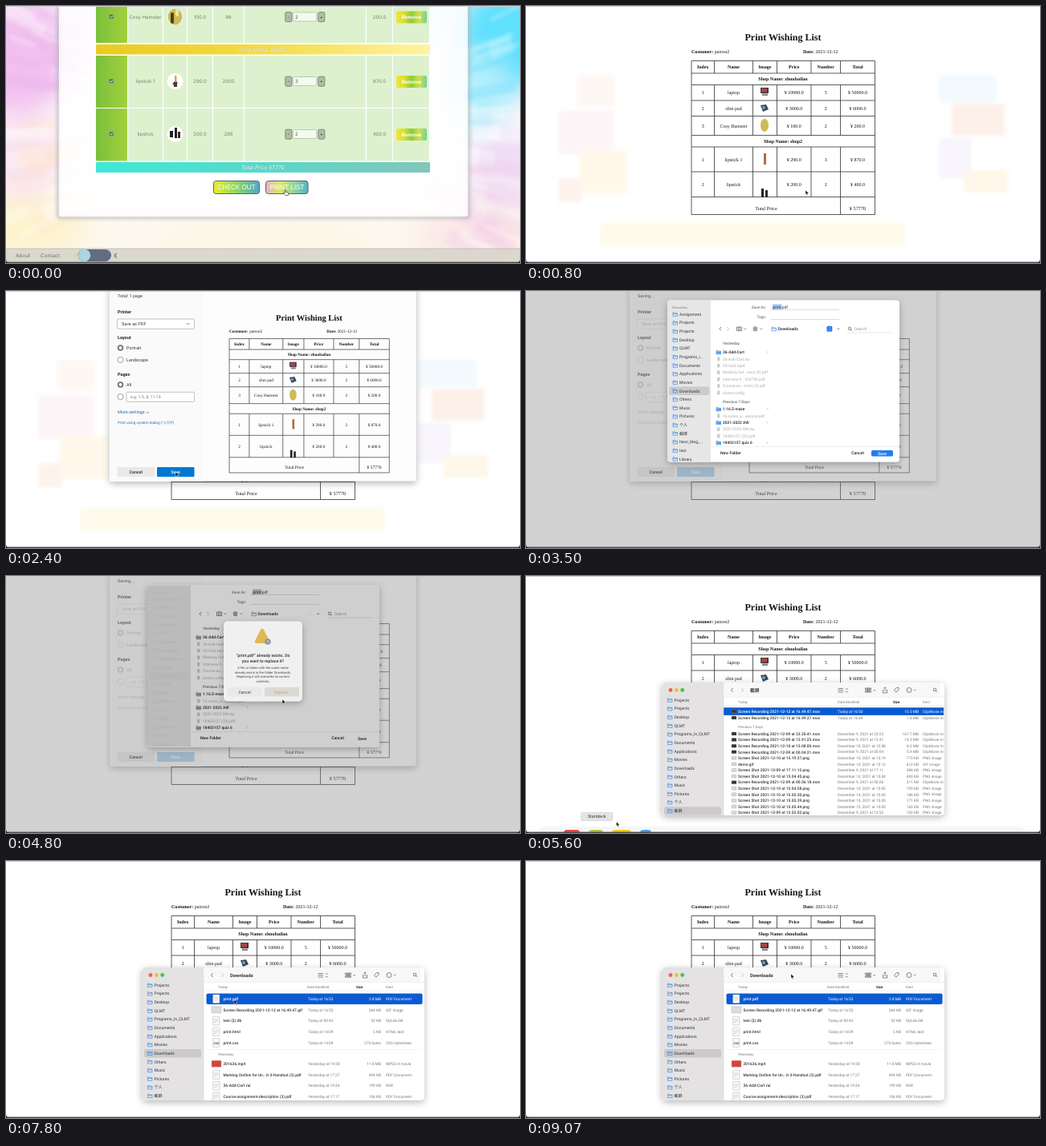
An HTML page that plays this animation: 640x321 px, repeating every 9.25 s.

```html
<!DOCTYPE html>
<html lang="en">
<head>
<meta charset="utf-8">
<title>Print wishing list</title>
<style>
html, body { margin: 0; width: 100%; height: 100%; overflow: hidden; background: #fff; }
svg { display: block; width: 640px; height: 321px; text-rendering: geometricPrecision; }
text { font-family: Roboto, "Noto Sans CJK SC", "Noto Sans CJK", sans-serif; white-space: pre; }
.shop text { font-family: Inter, sans-serif; }
.sheet text { font-family: "Liberation Serif", serif; }
.idle { filter: grayscale(1); }
.idle .places { opacity: .08; }
</style>
</head>
<body>
<svg id="stage" viewBox="0 0 640 321" xmlns="http://www.w3.org/2000/svg"></svg>
<script>
const LOOP = 9250;

// Markup helpers; the y of a text is its middle
const rect = (x, y, w, h, fill, r = 0, more = '') =>
  `<rect x="${x}" y="${y}" width="${w}" height="${h}" fill="${fill}" rx="${r}" ${more}/>`;
const text = (x, y, s, size = 5, fill = '#333', more = '') =>
  `<text x="${x}" y="${y + size * .36}" font-size="${size}" fill="${fill}" ${more}>${s}</text>`;
const dot = (x, y, r, fill, more = '') => `<circle cx="${x}" cy="${y}" r="${r}" fill="${fill}" ${more}/>`;
const line = (d, stroke = '#555', w = .7, fill = 'none') =>
  `<path d="${d}" stroke="${stroke}" stroke-width="${w}" fill="${fill}"/>`;
const group = (id, body, more = '') => `<g id="${id}" ${more}>${body}</g>`;
const grad = (id, ...stops) => `<linearGradient id="${id}">` + stops.map((c, i) =>
  `<stop offset="${i / (stops.length - 1)}" stop-color="${c}"/>`).join('') + '</linearGradient>';
const MID = 'text-anchor="middle"', END = 'text-anchor="end"', BOLD = 'font-weight="700"', SEMI = 'font-weight="500"';

const defs = '<defs>' +
  grad('check', '#78c03c', '#8fc83c', '#a2d03d') + grad('gold', '#e8cb22', '#f3dc43', '#fff3a3') +
  grad('aqua', '#3fe8d6', '#58d9cb', '#83c6bb') + grad('remove', '#f0e53a', '#d9e02c', '#8ccb3e', '#d3e04a', '#6fd0a0') +
  grad('buy', '#e9ee2b', '#8ed663', '#4fa9c8') + grad('print', '#e7b2c8', '#dcea62', '#8ed6a0', '#58b3c4') +
  '<linearGradient id="sky" x2="0" y2="1"><stop stop-color="#fbf3fc"/><stop offset=".6" stop-color="#fdf8f8"/><stop offset="1" stop-color="#fcf8ea"/></linearGradient>' +
  '<filter id="soft" x="-30%" y="-30%" width="160%" height="160%"><feGaussianBlur stdDeviation="16"/></filter>' +
  '<filter id="smear"><feGaussianBlur stdDeviation="2"/></filter>' +
  '<filter id="drop" x="-10%" y="-10%" width="120%" height="125%"><feDropShadow dx="0" dy="2.5" stdDeviation="4" flood-opacity=".28"/></filter></defs>';

let seed = 7;
const rnd = () => (seed = seed * 16807 % 2147483647) / 2147483647;

function watercolor() {
  const blobs = [
    [15, 60, 70, 75, '#f1c0ef'], [110, 10, 50, 30, '#f6dff6'], [20, 190, 50, 50, '#fae2ee'],
    [625, 40, 65, 70, '#5fe0fd'], [590, 110, 40, 50, '#b4effc'], [500, 5, 70, 25, '#cdf3fd'], [620, 200, 45, 50, '#f0dcf4'],
    [30, 275, 70, 35, '#fdf3cc'], [320, 295, 130, 18, '#fdf6e2'], [580, 285, 70, 30, '#fbe6e6']
  ].map(([x, y, a, b, c]) => `<ellipse cx="${x}" cy="${y}" rx="${a}" ry="${b}" fill="${c}"/>`).join('');
  // Brush strokes point to the middle of the page
  let strokes = '';
  for (let i = 0; i < 70; i++) {
    const right = i % 2, x = right ? 560 + rnd() * 80 : rnd() * 80, y = rnd() * 300;
    const c = rnd() < .5 ? '#fff' : right ? (y < 120 ? '#62dbfa' : '#f0c8ea') : (y < 150 ? '#e8b0ea' : '#fde2c4');
    const turn = Math.atan2(y - 150, x - 320) * 180 / Math.PI;
    strokes += rect(x - 35, y, 30 + rnd() * 45, 4 + rnd() * 18, c, 0, `opacity=".27" transform="rotate(${turn} ${x} ${y})"`);
  }
  return rect(0, 0, 640, 321, 'url(#sky)') + `<g filter="url(#soft)">${blobs}</g><g filter="url(#smear)">${strokes}</g>`;
}

function cart() {
  const cols = [152, 196, 226, 258, 297, 449, 482, 528];
  const row = (top, h, mid, name, price, stock, count, sum) => {
    let s = rect(112, top, 39, h, 'url(#check)', 1);
    for (let i = 0; i < 7; i++) s += rect(cols[i], top, cols[i + 1] - cols[i] - 1.2, h, '#ddf1cf', 1);
    s += rect(128.7, mid - 2.7, 5, 5, '#5d6b78', 1) + line(`M129.8 ${mid - .2}l1.2 1.3 1.8-2.6`, '#fff', .8);
    [[173.5, name], [241.5, price], [277, stock], [465, sum]].forEach(([x, v]) => s += text(x, mid, v, 6, '#7b8073', MID));
    s += dot(210.5, mid, 10, '#fff');
    [[347.8, '-'], [388.8, '+']].forEach(([x, v]) =>
      s += rect(x, mid - 5.8, 8, 12, '#b1bfa6', 1.5, 'stroke="#6b7463" stroke-width=".8"') + text(x + 4, mid, v, 6, '#333', MID));
    s += rect(357.3, mid - 5.5, 29.5, 11, '#f4fbee', 2, 'stroke="#a9b59e" stroke-width=".7"') + text(360, mid, count, 6, '#555');
    return s + rect(486, mid - 7, 38, 15, 'url(#remove)', 2) + text(505, mid + .5, 'Remove', 6.3, '#fff', MID + ' ' + BOLD);
  };
  const bar = (y, h, fill, s) => rect(112, y, 416, h, `url(#${fill})`, 1.5) +
    text(320.3, y + h / 2 + .4, s, 6.5, '#777', MID + ' font-style="italic" opacity=".6"') +
    text(319.8, y + h / 2, s, 6.5, '#fff', MID + ' font-style="italic"');
  return watercolor() +
    rect(65, -8, 511, 272, 'none', 2, 'stroke="#aab0b6" stroke-width="4" opacity=".7" filter="url(#smear)"') +
    rect(66, -8, 509, 271, '#fff', 2, 'fill-opacity=".85"') +
    row(-20, 66, 13.5, 'Cosy Hamster', '100.0', '98', '2', '200.0') +
    `<ellipse cx="210.5" cy="13.5" rx="9" ry="10" fill="#cdbb58"/>` + rect(205, 8, 4, 14, '#4a4226', 2) + rect(211, 4, 4, 9, '#efe3a0', 2) +
    bar(48, 12.5, 'gold', 'Shop Name: shop2') +
    row(62, 65, 94, 'lipstick 1', '290.0', '2000', '3', '870.0') +
    line('M207 97l4-4 3 3-4 4z', 'none', 0, '#bb4a2e') + rect(210, 87, 2.5, 8, '#d6a548') + rect(209, 95, 4, 6, '#4b3a30') +
    row(128, 65.5, 160, 'lipstick', '200.0', '298', '2', '400.0') +
    rect(204, 156, 4, 8, '#222') + rect(210, 152, 3, 13, '#262020') + rect(214, 157, 3, 8, '#3a2529') +
    bar(195, 13, 'aqua', 'Total Price:57770') +
    rect(258.5, 218.5, 57, 16, 'url(#buy)', 3, 'stroke="#52666a"') + text(287, 226.5, 'CHECK OUT', 8, '#fff', MID) +
    rect(323.5, 218.5, 52.5, 16, 'url(#print)', 3, 'stroke="#52666a"') + text(350, 226.5, 'PRINT LIST', 8, '#fff', MID) +
    rect(0, 303, 640, 16.5, '#d9d6cd', 0, 'opacity=".93"') + rect(0, 302.6, 640, .8, '#bdbab3') +
    text(12, 311.5, 'About', 6.4, '#707070') + text(43, 311.5, 'Contact', 6.4, '#707070') +
    dot(86, 311.5, 2, '#eed66a') + rect(89.5, 304, 41.5, 15, '#626d80', 7.5) + dot(97.5, 311.5, 7.7, '#a9d5e4') +
    line('M138.6 308.6a3.2 3.2 0 1 0 0 6 4 4 0 0 1 0-6', 'none', 0, '#999');
}

function sheet() {
  const xs = [206, 234.5, 282.5, 312.5, 355, 391.5, 434.5];
  const mids = xs.slice(1).map((x, i) => (x + xs[i]) / 2);
  const cells = (top, bottom, vals, more = '') => {
    let d = xs.map(x => `M${x} ${top}V${bottom}`).join('') + `M206 ${bottom}H434.5`;
    return line(d, '#333', .8) + vals.map((v, i) => v && text(mids[i], (top + bottom) / 2, v, 6, '#111', MID + more)).join('');
  };
  const shop = (top, name) => line(`M206 ${top}v14.5H434.5v-14.5`, '#333', .8) +
    text(320, top + 7.3, 'Shop Name: ' + name, 6, '#111', MID + ' ' + BOLD);
  return text(320, 38.8, 'Print Wishing List', 12, '#111', MID + ' ' + BOLD) +
    text(206, 57.3, '<tspan font-weight="700">Customer:</tspan> patron2', 6, '#111') +
    text(345, 57.3, '<tspan font-weight="700">Date:</tspan> 2021-12-12', 6, '#111') +
    line('M206 68.5H434.5', '#333', .8) +
    cells(68.5, 84, ['Index', 'Name', 'Image', 'Price', 'Number', 'Total'], ' ' + BOLD) + shop(84, 'zhoubailan') +
    cells(98.5, 118, ['1', 'laptop', '', '¥ 10000.0', '5', '¥ 50000.0']) +
    cells(118, 137.5, ['2', 'slim pad', '', '¥ 3000.0', '2', '¥ 6000.0']) +
    cells(137.5, 161.5, ['3', 'Cosy Hamster', '', '¥ 100.0', '2', '¥ 200.0']) + shop(161.5, 'shop2') +
    cells(176, 207, ['1', 'lipstick 1', '', '¥ 290.0', '3', '¥ 870.0']) +
    cells(207, 238.5, ['2', 'lipstick', '', '¥ 200.0', '2', '¥ 400.0']) +
    line('M206 238.5V260.5H434.5V238.5M391.5 238.5v22', '#333', .8) +
    text(299, 252.5, 'Total Price', 6.3, '#111', MID) + text(413, 252.5, '¥ 57770', 6.3, '#111', MID) +
    rect(292, 102, 10, 7, '#3b3d48') + rect(293, 103, 7, 4.5, '#b2423e') + rect(294, 109.5, 7, 2.5, '#888') +
    line('M292 124l7-1 3 6-7 3z', 'none', 0, '#3d4654') + dot(296, 127, 2, '#6b9cc8') +
    `<ellipse cx="297" cy="149" rx="5" ry="8" fill="#cdbb58"/>` +
    rect(296, 184, 3, 14, '#b76b3c') + rect(293, 228, 3, 11, '#222') + rect(298, 230, 3, 9, '#3a2529');
}

function dialog() {
  const radio = (y, on, s) => dot(142.5, y, 3.6, '#fff', 'stroke="#888" stroke-width=".8"') +
    (on ? dot(142.5, y, 2.7, 'none', 'stroke="#777" stroke-width="1.6"') : '') + text(150, y, s, 5.5, '#333');
  const blue = '#1670c5';
  return rect(129, -12, 382, 250, '#fafafa', 3, 'filter="url(#drop)"') + rect(244.5, -10, 266.5, 248, '#e2e2e2') +
    group('loading', line('M383 112a6 6 0 1 1-6-6', '#f6f6f6', 1.6)) +
    group('preview', rect(244.5, -10, 266, 247, '#fdfdfd') + '<use href="#list" transform="translate(98.4 -.2) scale(.872)"/>') +
    group('total', text(139, 6, 'Total: 1 page', 5.4)) +
    text(139, 26.5, 'Printer', 5.5, '#222', BOLD) +
    rect(138.5, 35, 96, 12.3, '#fff', 1, 'stroke="#aaa" stroke-width=".7"') + text(144, 41.2, 'Save as PDF', 5.5) + line('M224.5 40l2 2 2-2') +
    text(139, 58.5, 'Layout', 5.5, '#222', BOLD) + radio(71, 1, 'Portrait') + radio(86, 0, 'Landscape') +
    text(139, 104.5, 'Pages', 5.5, '#222', BOLD) + radio(117, 1, 'All') + radio(132, 0, '') +
    rect(150, 126.3, 84.5, 12, '#fff', 1, 'stroke="#aaa" stroke-width=".7"') + text(155, 132.3, 'e.g. 1-5, 8, 11-13', 5.2, '#777') +
    text(139, 151.5, 'More settings', 5.5, blue) + line('M175 151l1.6 1.6 1.6-1.6', blue) +
    text(139, 164, 'Print using system dialog (⌥⌘P)', 4.7, blue) +
    rect(188, 220, 46.5, 12, '#0078d4', 1) + text(211.2, 226, 'Save', 5.3, '#fff', MID + ' ' + SEMI) +
    group('busy', rect(130, 12, 114, 225, '#f8f8f8', 0, 'opacity=".68"') + text(139, 6, 'Saving...', 5.4) +
      text(139, 26.5, 'Printer', 5.5, '#666', BOLD) + text(139, 58.5, 'Layout', 5.5, '#666', BOLD) + text(139, 104.5, 'Pages', 5.5, '#666', BOLD)) +
    rect(138.5, 220, 46.5, 12, '#e9e9e9', 1) + text(161.7, 226, 'Cancel', 5.3, '#222', MID + ' ' + SEMI);
}

const folder = (x, y, c = '#3b8eea') => line(`M${x} ${y - 2}h2l.7.8h2.8v3.6h-5.5zM${x} ${y - .4}h5.5`, c, .7);
const glass = (x, y) => dot(x, y, 1.8, 'none', 'stroke="#555" stroke-width=".7"') + line(`M${x + 1.3} ${y + 1.3}l1.6 1.6`);
const PLACES = ['Projects', 'Projects', 'Desktop', 'QLMT', 'Programs_in_QLMT', 'Documents', 'Applications', 'Movies',
  'Downloads', 'Others', 'Music', 'Pictures', '个人', '截屏'];
const sidebar = (x, y, items, dx) => items.map((s, i) =>
  folder(x, y + i * 10.63) + text(x + dx, y + i * 10.63, s, 5.1, '#333')).join('');

function savePanel() {
  const places = ['Assignment', ...PLACES, 'hexo_blog_...', 'test', 'Library'];
  places[5] = 'Programs_i...';
  const file = y0 => (s, i) => {
    const open = s[0] === '*', y = y0 + i * 8.4;
    return (open ? folder(237, y, '#2c7fe0') + rect(237.3, y - .6, 5, 2.4, '#4ba0f0') + line(`M300 ${y - 1.2}l1.2 1.2-1.2 1.2`, '#888', .5)
      : rect(238, y - 2.3, 3.4, 4.6, '#ccc', .4)) + text(245, y, s.replace('*', ''), 4.9, open ? '#222' : '#aaa', open ? SEMI : '');
  };
  return rect(176, 11.5, 289, 202, '#fff', 4, 'filter="url(#drop)"') +
    line('M180 11.5H230V213.5H180a4 4 0 0 1-4-4v-194a4 4 0 0 1 4-4', 'none', 0, '#e6e6e6') +
    '<g class="places">' + text(182, 20.5, 'Favourites', 4, '#999', BOLD) + rect(178, 119.5, 50, 10.5, '#cbcbcb', 2) +
    sidebar(183, 29, places, 8) + '</g>' +
    text(299, 20, 'Save As:', 4.8, '#555', END) + rect(307, 16.5, 11.5, 6.5, '#9cc8fa') + text(307.3, 19.8, 'print.pdf', 5) +
    text(299, 32, 'Tags:', 4.8, '#555', END) + line('M305 23.5H390M305 35.5H390', '#bbb', .5) +
    line('M243 45l-2 2.2 2 2.2', '#444') + line('M250.5 45l2 2.2-2 2.2', '#aaa') +
    line('M262.5 45h6v4.6h-6zM264.5 45v4.6M266.5 45v4.6M271.5 46.6l1.3 1.3 1.3-1.3') +
    line('M283.5 45h4v4.6h-4zM283.5 47.3h4M285.5 45v4.6M291.5 46.6l1.3 1.3 1.3-1.3') +
    folder(306, 47.3) + text(313.5, 47.3, 'Downloads', 5.1, '#222', SEMI) +
    group('stepper', rect(374.5, 43.8, 6.8, 7, '#217df2', 1.5)) + line('M376.6 46.6l1.3-1.3 1.3 1.3M376.6 48l1.3 1.3 1.3-1.3', '#ddd', .6) +
    line('M387.5 48l1.3-1.4 1.3 1.4', '#444') + glass(403, 46.8) + text(409, 47.3, 'Search', 5, '#999') + line('M400 52H457', '#ccc', .5) +
    text(245, 65, 'Yesterday', 4.7, '#666', SEMI) +
    ['*36-Add-Cart', '36-Add-Cart.rar', '201636.mp4', 'Marking Out...nout (3).pdf', 'interview 9...934750.pdf', 'Course-as...ment (3).pdf', 'share.config'].map(file(76.5)).join('') +
    text(245, 138.5, 'Previous 7 Days', 4.7, '#666', SEMI) +
    ['*1.16.5-maze', '16 notes_a...second.pdf', '*2021-2022 AW', '2021-2022 AW.zip', '18403157 (22).pdf', '*18403157 quiz 6'].map(file(147.5)).join('') +
    line('M230 194.5H465', '#ddd', .5) + text(242, 202.5, 'New Folder', 5.1, '#222', SEMI) +
    text(413, 202.5, 'Cancel', 5.1, '#222', MID + ' ' + SEMI) + text(443.5, 202.7, 'Save', 5.1, '#222', MID + ' ' + SEMI) +
    group('ready', rect(430, 199, 27, 7.6, '#217df2', 1.5) + text(443.5, 202.7, 'Save', 5.1, '#fff', MID + ' ' + SEMI));
}

function alertBox() {
  const mid = (y, s, size, more = '') => text(320, y, s, size, '#444', MID + more);
  return rect(176, 11.5, 289, 202, '#000', 4, 'opacity=".19"') +
    rect(271, 56.5, 98, 100, '#f0f0f0', 5, 'filter="url(#drop)"') +
    line('M317 67q2-3 4 0l7 14q1 3-2 3h-14q-3 0-2-3z', 'none', 0, '#e2b853') + dot(326, 82, 3.8, '#92969c') + line('M326 80v2.2l1.6 1', '#fff', .7) +
    mid(99, '“print.pdf” already exists. Do', 5.2, ' ' + BOLD) + mid(105.7, 'you want to replace it?', 5.2, ' ' + BOLD) +
    ['A file or folder with the same name', 'already exists in the folder Downloads.', 'Replacing it will overwrite its current', 'contents.']
      .map((s, i) => mid(115 + i * 5.4, s, 4.1)).join('') +
    rect(275.5, 139, 43, 11.5, '#e9e9e9', 2) + text(297, 144.7, 'Cancel', 5, '#333', MID) +
    rect(322, 139, 43, 11.5, '#dcdad5', 2) + text(343, 144.7, 'Replace', 5, '#c9a86a', MID);
}

const BLUE = '#0a5bd3';
const shell = (title, lit) => rect(169, 133, 352, 166, '#fff', 5, 'filter="url(#drop)"') +
  line('M174 133H246V299H174a5 5 0 0 1-5-5V138a5 5 0 0 1 5-5', 'none', 0, '#e4e2e3') +
  dot(180, 142.5, 2.4, '#f35f57') + dot(187.3, 142.5, 2.4, '#f8bd2f') + dot(194.7, 142.5, 2.4, '#3fc745') +
  rect(172, lit - 5, 71, 10.4, '#cbc9ca', 2) + sidebar(176.5, 155, PLACES, 8) + line('M246 133V299', '#ccc', .5) +
  rect(246.2, 133, 270, 18, '#f8f8f8') +
  line('M257.5 140l-2 2.5 2 2.5', '#444') + line('M268.5 140l2 2.5-2 2.5', '#aaa') + text(279, 142.7, title, 5.8, '#333', BOLD) +
  line('M388.5 140.5h6.5M388.5 142.7h6.5M388.5 145h6.5M398 141.7l1.4-1.5 1.4 1.5M398 143.7l1.4 1.5 1.4-1.5') +
  line('M422.5 140h7v1.8h-7zM422.5 143.4h7v1.8h-7zM425 140v5M427.3 140v5M432.5 142l1.3 1.3 1.3-1.3') +
  line('M444.5 142v4h5v-4M447 144v-5M445.6 140.3l1.4-1.4 1.4 1.4') + line('M458.5 142.5l3-3h2.5v2.5l-3.3 3.3z') +
  dot(477, 142.5, 3, 'none', 'stroke="#555" stroke-width=".7"') + text(477, 142.1, '···', 5, '#555', MID) + line('M483 142l1.2 1.2 1.2-1.2') +
  glass(509, 142) + line('M246 151.3H521M246 162H521', '#ddd', .5);
const heads = (date, size, kind) => text(264, 157, 'Today', 4.4, '#777') + text(date, 157, 'Date Modified', 4.4, '#777') +
  text(size, 157, 'Size', 4.4, '#222', BOLD) + text(kind, 157, 'Kind', 4.4, '#777');

function recordings() {
  const row = (y, [name, date, size], on) => {
    const kind = name.endsWith('mov') ? 'ClipMovie m' : name.endsWith('gif') ? 'GIF image' : 'PNG image';
    const ink = on ? '#fff' : '#333', pale = on ? '#fff' : '#777';
    return (on ? rect(246.2, y - 4.7, 274, 9.6, BLUE) : '') + rect(256, y - 2, 6, 4, kind[0] === 'C' ? '#333' : '#d4d7dc', .4, 'stroke="#999" stroke-width=".3"') +
      text(264, y, name, 4.9, ink, SEMI) + text(388, y, date, 4.8, pale) + text(489, y, size, 4.8, pale, END) + text(494, y, kind, 4.7, pale);
  };
  const rec = s => `Screen Recording 2021-12-${s}.mov`, shot = s => `Screen Shot 2021-12-${s}.png`;
  const dec = s => 'December ' + s.replace(' ', ', 2021 at ');
  const older = [
    [rec('09 at 23.20.41'), dec('9 23:23'), '167.7 MB'], [rec('09 at 15.41.23'), dec('9 15:41'), '14.3 MB'],
    [rec('10 at 15.08.00'), dec('10 15:08'), '8.2 MB'], [rec('09 at 00.04.21'), dec('9 00:04'), '5.4 MB'],
    [shot('10 at 15.19.27'), dec('10 15:19'), '773 KB'], ['demo.gif', dec('10 15:12'), '612 KB'],
    [shot('09 at 17.11.12'), dec('9 17:11'), '584 KB'], [shot('10 at 15.04.45'), dec('10 15:04'), '493 KB'],
    [rec('09 at 00.06.18'), dec('9 00:06'), '311 KB'], [shot('10 at 15.04.58'), dec('10 15:05'), '195 KB'],
    [shot('10 at 15.05.30'), dec('10 15:05'), '186 KB'], [shot('10 at 15.05.39'), dec('10 15:05'), '171 KB'],
    [shot('10 at 15.05.44'), dec('10 15:05'), '163 KB'], [shot('09 at 13.52.02'), dec('9 13:52'), '102 KB']];
  return shell('截屏', 293.2) + heads(388, 457, 494) +
    row(169, [rec('12 at 16.49.47'), 'Today at 16:50', '10.3 MB'], true) + row(177, [rec('12 at 16.49.37'), 'Today at 16:49', '1.8 MB']) +
    text(264, 188, 'Previous 7 Days', 4.4, '#777') + older.map((r, i) => row(197 + i * 7.58, r)).join('');
}

function downloads() {
  const row = y0 => ([name, date, size, kind], i) => {
    const y = y0 + i * 13.7, on = name === 'print.pdf', ink = on ? '#fff' : '#333', pale = on ? '#fff' : '#777';
    const media = /mp4|gif/.test(name);
    return (on ? rect(249.5, y - 6.7, 269, 13.5, BLUE, 2) : '') +
      (media ? rect(256, y - 4, 12, 8, name.endsWith('4') ? '#d8433a' : '#d9dce2', .5, 'stroke="#aaa" stroke-width=".4"')
        : rect(257.7, y - 5.3, 8.2, 10.6, '#fafafa', .5, 'stroke="#aaa" stroke-width=".5"') +
          (name.endsWith('css') ? text(261.8, y + .5, 'CSS', 3.6, '#444', MID + ' ' + BOLD) : line(`M259.3 ${y - 2}h5M259.3 ${y}h5M259.3 ${y + 2}h3`, '#bbb', .6))) +
      text(270.5, y, name, 4.9, ink, SEMI) + text(376, y, date, 4.8, pale) + text(467, y, size, 4.8, pale, END) + text(473, y, kind, 4.8, pale);
  };
  return shell('Downloads', 240) + heads(375, 436, 473) + [
    ['print.pdf', 'Today at 16:53', '2.8 MB', 'PDF Document'],
    ['Screen Recording 2021-12-12 at 16.49.47.gif', 'Today at 16:53', '364 KB', 'GIF image'],
    ['test (2).db', 'Today at 00:42', '53 KB', 'SQLite DB'],
    ['print.html', 'Today at 14:09', '5 KB', 'HTML text'],
    ['print.css', 'Today at 14:09', '273 bytes', 'CSS stylesheet']].map(row(172.2)).join('') +
    text(264, 241, 'Yesterday', 4.4, '#777') + line('M250 235.5H517', '#e4e4e4', .5) + [
    ['201636.mp4', 'Yesterday at 19:30', '11.8 MB', 'MPEG-4 movie'],
    ['Marking Outline for Un...it-3-Handout (3).pdf', 'Yesterday at 17:27', '694 KB', 'PDF Document'],
    ['36-Add-Cart.rar', 'Yesterday at 19:34', '199 KB', 'RAR'],
    ['Course-assignment-description (3).pdf', 'Yesterday at 17:17', '106 KB', 'PDF Document']].map(row(253.3)).join('');
}

const wash = () => '<g filter="url(#smear)" opacity=".4">' + [
  [64, 86, 46, 40, '#fdeee6'], [40, 130, 70, 55, '#fbe6ee'], [66, 180, 60, 55, '#fff0cf'], [40, 215, 30, 30, '#fde3d2'],
  [514, 86, 72, 34, '#dff3fb'], [530, 122, 66, 40, '#f8dcc9'], [514, 165, 40, 50, '#eee4f8'], [545, 205, 55, 28, '#fdeccb'],
  [92, 270, 380, 30, '#fdf4d2']].map(([x, y, w, h, c]) => rect(x, y, w, h, c)).join('') + '</g>';

const dock = () => rect(17, 313, 604, 40, '#eee', 6, 'opacity=".5"') +
  [[47, 20, '#ee4a47'], [78, 18, '#a9cf3e'], [107, 24, '#f9cb1c'], [142, 14, '#4c9df0']].map(([x, w, c]) => rect(x, 317, w, 24, c, 4)).join('');

document.getElementById('stage').innerHTML = defs + rect(0, 0, 640, 321, '#fff') +
  group('washed', wash()) + group('list', sheet(), 'class="sheet"') + group('dialog', dialog()) +
  group('dim', rect(0, 0, 640, 321, '#d0d0d0', 0, 'opacity=".3"') + rect(0, 0, 640, 321, '#000', 0, 'opacity=".13"')) +
  group('panel', savePanel()) + group('alert', alertBox()) +
  group('shots', recordings()) + group('files', downloads()) + group('dock', dock()) +
  group('tip', rect(68.5, 295.3, 39.5, 10.5, '#e4e4e4', 2, 'stroke="#ccc" stroke-width=".5"') + text(88.3, 300.5, 'Startdeck', 5.3, '#333', MID)) +
  group('cart', cart(), 'class="shop"') + rect(0, 0, 640, 1, '#cfcfcf') + rect(0, 319.6, 640, 1.4, '#4a4a4a') +
  line('M0 316v5h5q-5 0-5-5M640 316v5h-5q5 0 5-5', 'none', 0, '#222') +
  group('arrow', line('M0 0v5.6l1.3-1.2.9 2 1-.4-.9-2h1.8z', '#fff', .5, '#000')) +
  group('hand', line('M-.8 0q.8-1 1.5 0v2.4l2.6.6q.7.3.5 1.2l-.5 2.3h-3.6l-2.2-2.6q-.2-1 .7-.8l1 .7z', '#222', .6, '#fff'));

// When each part is on the stage
const SHOWN = {
  cart: [0, 700], hand: [0, 700], washed: [700, 3500], dialog: [1200, 5100], loading: [1200, 1900], preview: [1900, 5100],
  total: [1200, 2700], busy: [2700, 5100], panel: [3000, 5100], ready: [3000, 4500], stepper: [3000, 4500],
  dim: [3500, 5100], alert: [4500, 5100],
  dock: [5300, 5800], tip: [5400, 5700], shots: [5500, 6500], files: [6500, LOOP]
};
const PATH = [[0, 348, 230], [900, 348, 230], [1600, 216, 70], [2400, 211, 226], [3000, 211, 226], [3600, 330, 218], [4200, 443, 203],
  [4500, 443, 203], [4800, 344, 154], [5000, 343, 146], [5100, 343, 146], [5400, 72, 314], [5600, 112.5, 307], [6300, 196, 240],
  [6500, 196, 240], [6900, 284, 173.5], [8000, 284, 173.5], [8600, 330, 141], [LOOP, 330, 141]];
const DOCK = [[0, 30], [5300, 12], [5400, -6], [5500, -6], [5600, 0], [5700, 10], [LOOP, 30]];

function at(keys, t) {
  const i = Math.max(1, keys.findIndex(k => k[0] > t)), [a, b] = [keys[i - 1], keys[i]];
  const p = (t - a[0]) / (b[0] - a[0]), e = p * p * (3 - 2 * p);
  return a.slice(1).map((v, n) => v + (b[n + 1] - v) * e);
}
const $ = id => document.getElementById(id);
const start = performance.now();

function draw(now) {
  const t = Math.floor(Math.max(0, now - start) % LOOP / 100) * 100;
  for (const id in SHOWN) $(id).style.display = t >= SHOWN[id][0] && t < SHOWN[id][1] ? '' : 'none';
  $('panel').classList.toggle('idle', t >= SHOWN.alert[0]);
  const spot = `translate(${at(PATH, t).join(' ')})`;
  $('hand').setAttribute('transform', spot);
  $('arrow').setAttribute('transform', spot);
  $('arrow').style.display = t < 700 || (t >= 3000 && t < 3600) ? 'none' : '';
  $('dock').setAttribute('transform', `translate(0 ${at(DOCK, t)[0]})`);
  requestAnimationFrame(draw);
}
draw(start);
</script>
</body>
</html>
```
